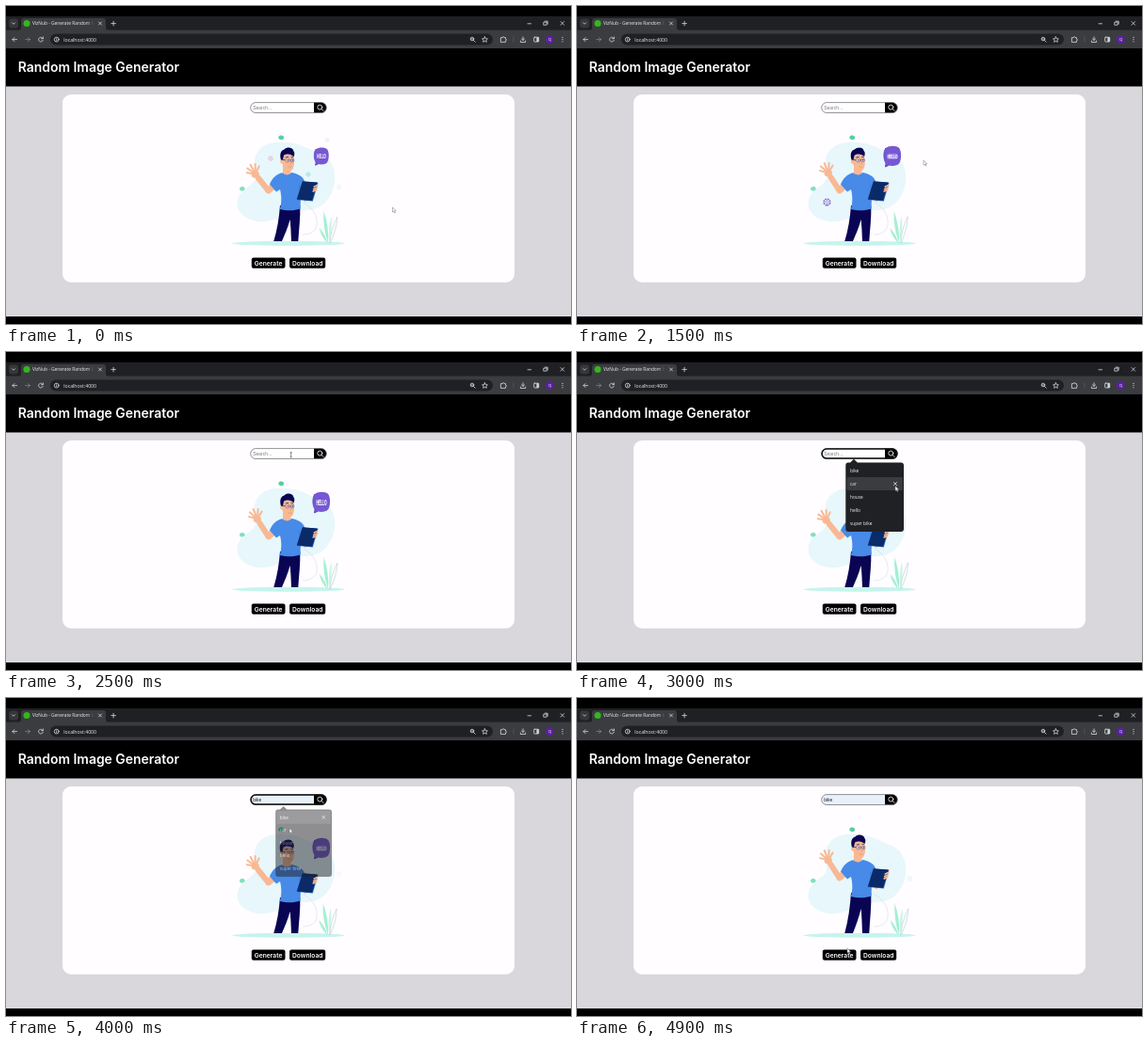
Animation, 600 px wide and 338 px high, one loop 5 s. Source, as an HTML page:

```html
<!DOCTYPE html>
<html lang="en">
<head>
<meta charset="utf-8">
<title>Random Image Generator</title>
<style>
html, body { margin: 0; width: 100%; height: 100%; overflow: hidden; background: #000; }
svg { display: block; width: 100%; height: 100%; }
.page { font-family: Inter, "Open Sans", sans-serif; fill: #fff; }
.ui { font-family: "Open Sans", "Noto Sans", sans-serif; fill: #eeeff1; }
.field { font-family: "Liberation Sans", Arial, sans-serif; font-size: 5px; }
.line { fill: none; stroke: #d9dadd; stroke-width: .8; stroke-linecap: round; stroke-linejoin: round; }
.white { stroke: #fff; }
.skin { fill: #f9b893; }
.limb { fill: none; stroke: #f9b893; stroke-linecap: round; stroke-linejoin: round; }
.navy { fill: #0a0553; }
</style>
</head>
<body>
<svg viewBox="0 0 600 338">
  <defs>
    <linearGradient id="fade">
      <stop offset="0" stop-color="#3b3c3f" stop-opacity="0"/>
      <stop offset="1" stop-color="#3b3c3f"/>
    </linearGradient>
    <clipPath id="titleClip"><rect x="27" y="12" width="66" height="14"/></clipPath>
    <clipPath id="fieldClip"><rect x="259.7" y="102.6" width="80.6" height="10.9" rx="5.4"/></clipPath>
  </defs>

  <!-- browser -->
  <rect width="600" height="338"/>
  <rect y="11" width="600" height="16" fill="#1f2023"/>
  <rect x="3" y="13.5" width="10" height="10" rx="3" fill="#36373a"/>
  <path class="line" d="M6.5 17.8l1.5 1.5 1.5-1.5"/>
  <path d="M13 26q3 0 3-3v-7q0-3 3-3h84q3 0 3 3v7q0 3 3 3z" fill="#3b3c3f"/>
  <circle cx="22" cy="18.6" r="3.5" fill="#35b51f"/>
  <g clip-path="url(#titleClip)">
    <text class="ui" x="28" y="20.4" font-size="4.85">VizNub - Generate Random Images</text>
    <rect x="87" y="13" width="6" height="12" fill="url(#fade)"/>
  </g>
  <path class="line" d="M98.5 17l3 3m0-3l-3 3M111.8 18.6h4.6m-2.3-2.3v4.6"/>
  <path class="line" d="M554 18.8h3.6M571.2 17.2h3v3h-3zM572.2 16.2h3v3M589 16.6l3.6 3.6m0-3.6l-3.6 3.6"/>
  <rect y="25.6" width="600" height="19.4" fill="#3b3c3f"/>
  <rect x="47" y="29.6" width="470" height="12" rx="6" fill="#1f2023"/>
  <path class="line" d="M11.5 35.6h-4.6m2-2l-2 2 2 2"/>
  <path class="line" opacity=".45" d="M20.8 35.6h4.6m-2-2l2 2-2 2"/>
  <path class="line" d="M39.2 34.6a2.4 2.4 0 1 0 .1 1.8M39.4 32.9v1.8h-1.8"/>
  <circle class="line" cx="53.7" cy="35.6" r="2.4"/>
  <path class="line" d="M53.7 35.5v1.2M53.7 34.2v.1"/>
  <text class="ui" x="61.3" y="37.5" font-size="5.15">localhost:4000</text>
  <circle class="line" cx="495" cy="35" r="1.8"/>
  <path class="line" d="M496.4 36.4l1.8 1.8M494.2 35h1.6"/>
  <path class="line" d="M508.5 32.8l.9 1.9 2 .2-1.5 1.4.4 2-1.8-1-1.8 1 .4-2-1.5-1.4 2-.2z"/>
  <path class="line" d="M525.8 33.6h1.5a.9.9 0 0 1 1.8 0h1.4v1.5a.9.9 0 0 1 0 1.8v1.5h-4.7z"/>
  <path d="M539 32.5v6" stroke="#626468" stroke-width=".6"/>
  <path class="line" d="M549 32.8v3.6m-1.6-1.5l1.6 1.5 1.6-1.5M546.4 37v1.5h5.2V37"/>
  <rect class="line" x="560.7" y="33.2" width="5" height="4.8" rx=".6"/>
  <rect x="563.4" y="33.2" width="2.3" height="4.8" fill="#d5d6d9"/>
  <circle cx="577.3" cy="35.6" r="4.3" fill="#5b1fa3"/>
  <text class="ui" x="577.3" y="37" font-size="4.6" text-anchor="middle">q</text>
  <path class="line" stroke-dasharray="0 2.2" style="stroke-width:1.2" d="M591 33.4v4.5"/>

  <!-- page -->
  <text class="page" x="12.7" y="70" font-size="13.95" font-weight="600">Random Image Generator</text>
  <rect y="85.5" width="600" height="244.5" fill="#d9d7dc"/>
  <rect x="60" y="94" width="480" height="199.7" rx="9" fill="#fffdff"/>

  <!-- illustration -->
  <path fill="#e7f7fb" d="M264 166C264 150 280 143 297 145C314 146 320 152 332 156C347 161 352 178 348 192C343 210 331 217 318 217C301 217 286 231 268 229C250 227 242 214 247 203C252 192 267 190 265 179z"/>
  <ellipse id="drop" cx="353.5" rx="2.4" ry="3.2" fill="#e5f6fa"/>
  <ellipse cx="292.2" cy="139.8" rx="2.9" ry="2.3" fill="#55cf9f" transform="rotate(12 292 140)"/>
  <ellipse cx="250.8" cy="194.2" rx="2.8" ry="2.2" fill="#7fdfc1" transform="rotate(-12 251 194)"/>
  <ellipse cx="300" cy="252.3" rx="60" ry="2.4" fill="#c6f4ec"/>
  <path d="M316 209C327 215 331 224 330 233C329 240 322 243 315 243" fill="none" stroke="#ccd5e3" stroke-width=".5"/>
  <g id="plant"></g>
  <path id="legs" class="navy" d="M291 212H312.3C312.8 225 311 238 310.3 250H303C302.6 240 302.4 234 301.6 227C299.5 235 296 243 293 250H284.3C288 238 290 225 291 212z"/>
  <g id="upper">
    <g id="arm">
      <path class="limb" stroke-width="6" d="M278.5 196L268 183"/>
      <ellipse class="skin" cx="264.8" cy="179" rx="4.2" ry="3.8"/>
    </g>
    <path class="limb" stroke-width="7" d="M278.8 195.7L287 189"/>
    <path class="skin" d="M294 170H302.5V181H294z"/>
    <path fill="#478ae8" d="M293.4 177.3C297 180.5 301 180 303.2 177C310 178.5 315.5 181 317.5 187L319.5 199L313 202L312.5 215.5C306 218 297 217.5 290.8 216C293.2 208 292.5 201 291 195L287 197.5L280 189.5C283 182.5 287.5 178.5 293.4 177.3z"/>
    <path d="M311.5 190L313 202" stroke="#3574cf" stroke-width=".6"/>
    <path class="limb" stroke-width="3.8" d="M316 200.5L318 206L324 202"/>
    <path fill="#2b62b5" d="M315.3 186.5L331.5 187.8L325.8 207.6L309.2 206z"/>
    <path fill="#0b2a68" d="M314.8 186.3L330.6 187.6L325 206.7L308.8 205.4z"/>
    <path class="limb" stroke-width="1.8" d="M330.6 190.5l-3.2 1.5m3 1l-3.7 1.6m2.9.9l-3.3 1.3"/>
    <g id="head">
      <path class="skin" d="M293 158H305C306.2 163 306.4 169 304.6 172.8C302.8 176 298.5 175.8 295.4 172.6C293 169 292.2 163 293 158z"/>
      <ellipse class="skin" cx="292.8" cy="165.3" rx="1.8" ry="2.4"/>
      <path class="navy" d="M291.7 163.5C290 157.5 291.5 153.2 295 152.5C298 149.3 304.3 150 305 154C306.6 155.5 306 158.5 305.2 160C302 157 297.5 157 294.8 158.6L293.7 163.8z"/>
      <path fill="none" stroke="#24204f" stroke-width=".7" d="M296.5 161l3.2-.7M302.3 160.3l2.5.5M293 163.4l3.5.4m4.400 0h1.300"/>
      <g fill="#fde4d6" stroke="#4b4170" stroke-width=".5"><circle cx="298.700" cy="163.900" r="2.100"/><circle cx="303.900" cy="163.900" r="1.800"/></g>
      <g class="navy"><circle cx="299" cy="163.900" r=".7"/><circle cx="304" cy="163.900" r=".7"/></g>
      <path fill="none" stroke="#df8f6b" stroke-width=".6" d="M301.700 165l1 2.500-1.200.3M299.500 170.800q2 1.200 3.800-.2"/>
    </g>
  </g>
  <g id="bubble">
    <path fill="#7658d3" d="M-7.200-9C-3-12 4-12 7.200-9C10-5 9.500 4 7.200 7.300C5 10.200-1 10.300-4 9.400L-7.600 11L-7 7C-9.700 3-9.800-5-7.200-9z"/>
    <path fill="none" stroke="#5b3dbb" stroke-width=".8" d="M-7.200-9C-9.800-5-9.700 3-7 7L-7.600 11L-4 9.400"/>
    <g id="hello">
      <rect id="helloBox" x="-6" y="-3.300" width="12" height="6.200" fill="#b7a4f0"/>
      <text y="1.600" font-size="4.300" font-weight="800" text-anchor="middle" class="page">HELLO</text>
    </g>
  </g>
  <g id="sparks" fill="none"></g>

  <!-- controls -->
  <g clip-path="url(#fieldClip)">
    <rect id="fieldFill" x="259" y="102" width="82" height="12"/>
    <rect x="327" y="102" width="14" height="12"/>
  </g>
  <rect x="259.700" y="102.600" width="80.600" height="10.900" rx="5.400" fill="none" stroke="#68676b" stroke-width=".7"/>
  <rect id="focusRing" x="260.100" y="103" width="79.800" height="10.100" rx="5" fill="none" stroke="#101010" stroke-width="1.500"/>
  <text id="fieldText" class="field" x="262.200" y="109.800"></text>
  <circle class="line white" cx="333.300" cy="107.600" r="2.500"/>
  <path class="line white" d="M335.200 109.500l1.800 1.900"/>
  <g class="page" font-size="6.700" font-weight="600" text-anchor="middle">
    <rect x="260.800" y="267.600" width="35.700" height="11.100" rx="2" fill="#000"/>
    <rect x="301.100" y="267.600" width="38.100" height="11.100" rx="2" fill="#000"/>
    <text x="278.600" y="275.600">Generate</text>
    <text x="320.200" y="275.600">Download</text>
  </g>

  <g id="menu">
    <path fill="#202125" d="M288 117.500h2.200l3.800-3.700 3.800 3.700H344q3 0 3 3V188q0 3-3 3H288.300q-3 0-3-3v-67.500q0-3 2.700-3z"/>
    <rect id="hover" x="286.500" width="59.300" height="14" rx="1" fill="#3b3c40"/>
    <g id="options" class="ui" font-size="4.800"></g>
    <path id="remove" class="line" d="M-1.600-1.600l3.200 3.200m0-3.200l-3.200 3.200"/>
  </g>

  <path id="arrow" fill="#fff" stroke="#66676c" stroke-width=".45" stroke-linejoin="round" d="M0 0V5L1.200 4L2.100 6L3 5.600L2.100 3.700H3.700z"/>
  <path id="beam" fill="none" stroke="#333" stroke-width=".6" d="M-1-2.600h2M0-2.600v5.200M-1 2.600h2"/>
</svg>
<script>
const LOOP = 5000, STEP = 100;
const OPEN = 2600, PICK = 3900, BLUR = 4900;
const ROW_TOP = 119, ROW = 14;
const options = ["bike", "car", "house", "hello", "super bike"];
const $ = id => document.getElementById(id);
const set = (el, attrs) => { for (const k in attrs) el.setAttribute(k, attrs[k]); };
const clamp = v => Math.min(1, Math.max(0, v));
const smooth = v => v * v * (3 - 2 * v);
const ramp = (t, from, to) => clamp((t - from) / (to - from));
const wave = (t, period, peak = 0) => Math.cos(2 * Math.PI * (t - peak) / period);

function add(parent, tag, attrs) {
  const el = document.createElementNS("http://www.w3.org/2000/svg", tag);
  set(el, attrs);
  parent.appendChild(el);
  return el;
}

// Resting places of the pointer; it eases from one to the next.
const stops = [
  [0, 410.5, 214], [700, 389, 86], [1100, 420, 125], [1500, 368, 164],
  [2200, 302.7, 109.3], [OPEN, 302.7, 109.3], [2800, 412, 140],
  [3000, 338, 142.5], [3600, 302, 127], [4000, 301, 138.5], [4800, 287, 266]
];

function pointerAt(t) {
  const next = stops.findIndex(s => s[0] > t);
  if (next < 0) return stops.at(-1).slice(1);
  const [t0, x0, y0] = stops[next - 1], [t1, x1, y1] = stops[next];
  const k = smooth(ramp(t, t0, t1));
  return [x0 + (x1 - x0) * k, y0 + (y1 - y0) * k];
}

// Little flowers that swell and fade around a peak time.
const sparks = [
  { x: 281, y: 162, size: .65, peak: 0, color: "#d9a8c4" },
  { x: 321, y: 179, size: .6, peak: 0, color: "#74d9c0" },
  { x: 341, y: 142.5, size: .75, peak: 700, color: "#8f72da" },
  { x: 265.5, y: 208.5, size: 1.1, peak: 1700, color: "#8c62d2" }
];

function leaf(x, tipX, tipY, width, attrs) {
  const midX = (x + tipX) / 2, midY = (252 + tipY) / 2;
  add($("plant"), "path", { ...attrs, d:
    `M${x} 252Q${midX - width} ${midY} ${tipX} ${tipY}Q${midX + width} ${midY} ${x} 252z` });
}

function build() {
  for (const s of sparks) {
    s.el = add($("sparks"), "g", { stroke: s.color });
    s.petals = add(s.el, "circle", { r: 3.3, "stroke-width": 1.5 });
    add(s.el, "circle", { r: 1.5, "stroke-width": .7 });
  }
  for (let i = 0; i < 5; i++) {
    const angle = (-172 + i * 27) * Math.PI / 180;
    const reach = 9 + 2 * Math.sin(Math.PI * i / 4);
    const x = 264.8 + reach * Math.cos(angle), y = 178.5 + reach * Math.sin(angle);
    add($("arm"), "path", { class: "limb", "stroke-width": 2, d: `M264.8 178.5L${x} ${y}` });
  }
  leaf(342, 337, 218, 3.5, { fill: "#a4efd3" });
  leaf(341, 332.5, 236, 3, { fill: "#a4efd3" });
  leaf(343, 345, 223, 2.5, { fill: "#c6f5e5" });
  leaf(344, 351.5, 224, 3.5, { fill: "#f6fcfb", stroke: "#aebfc8", "stroke-width": .45 });
  options.forEach((name, i) => {
    add($("options"), "text", { x: 290, y: ROW_TOP + 8.9 + i * ROW }).textContent = name;
  });
}

function drawFigure(t) {
  const lift = 5 * ramp(t, 4500, 4900);
  set($("upper"), { transform: `translate(0 ${-lift})` });
  set($("legs"), { transform: `translate(0 250) scale(1 ${1 + lift / 38}) translate(0 -250)` });
  set($("arm"), { transform: `rotate(${2.9 - 9.5 * wave(t, 1000, 200)} 278 198)` });
  const sway = wave(t, LOOP / 2);
  set($("head"), { transform: `rotate(${sway} 298 176)` });
  set($("plant"), { transform: `rotate(${.8 * sway} 343 252)` });

  const size = (.85 + .15 * ramp(t, 0, 200)) * (1 - ramp(t, 4400, 4700));
  set($("bubble"), { transform: `translate(335 160) scale(${size})` });
  set($("hello"), { transform: `scale(.8 ${1.25 + .35 * sway})` });
  set($("helloBox"), { opacity: .6 * clamp(-2 * sway) });

  const fall = ramp((t + 1200) % LOOP, 0, 1500);
  set($("drop"), { cy: 186 + 8 * fall, opacity: Math.sin(Math.PI * fall) });

  for (const s of sparks) {
    const u = (t - s.peak) / 800;
    const transform = `translate(${s.x} ${s.y}) rotate(${t * .06}) scale(${s.size * (1 + .3 * u)})`;
    set(s.el, { transform, opacity: clamp(1 - u * u) });
    set(s.petals, { "stroke-dasharray": u < .3 ? "1.9 .7" : ".8 1.3" });
  }
}

function drawForm(t) {
  const [x, y] = pointerAt(t);
  const inside = x > 285 && x < 347 && y > ROW_TOP && y < ROW_TOP + 5 * ROW;
  const row = t >= PICK ? 0 : inside ? Math.floor((y - ROW_TOP) / ROW) : -1;
  const closing = ramp(t, PICK, PICK + 200);
  const shown = row < 0 ? 0 : 1;
  set($("menu"), {
    opacity: t < OPEN ? 0 : 1 - closing,
    transform: `translate(316 154) scale(${1 - .06 * closing}) translate(-316 -154)`
  });
  set($("hover"), { y: ROW_TOP + row * ROW, opacity: shown });
  set($("remove"), { transform: `translate(338 ${ROW_TOP + 7 + row * ROW})`, opacity: shown });

  const preview = t >= OPEN && shown && x < 333;
  const value = t >= PICK ? "bike" : preview ? options[row] : "";
  $("fieldText").textContent = value || "Search...";
  set($("fieldText"), { fill: value ? "#222" : "#7c7b80" });
  set($("fieldFill"), { fill: value ? "#e7f0fb" : "#fff" });
  set($("focusRing"), { opacity: t >= OPEN && t < BLUR ? 1 : 0 });

  const typing = x > 261 && x < 327 && y > 102.5 && y < 113.5;
  const transform = `translate(${x} ${y})`;
  set($("arrow"), { transform, opacity: typing ? 0 : 1 });
  set($("beam"), { transform, opacity: typing ? 1 : 0 });
}

function draw(ms) {
  const t = Math.floor(ms % LOOP / STEP) * STEP;
  drawFigure(t);
  drawForm(t);
}

build();
const start = performance.now();
function tick() {
  draw(performance.now() - start);
  requestAnimationFrame(tick);
}
tick();
</script>
</body>
</html>
```
